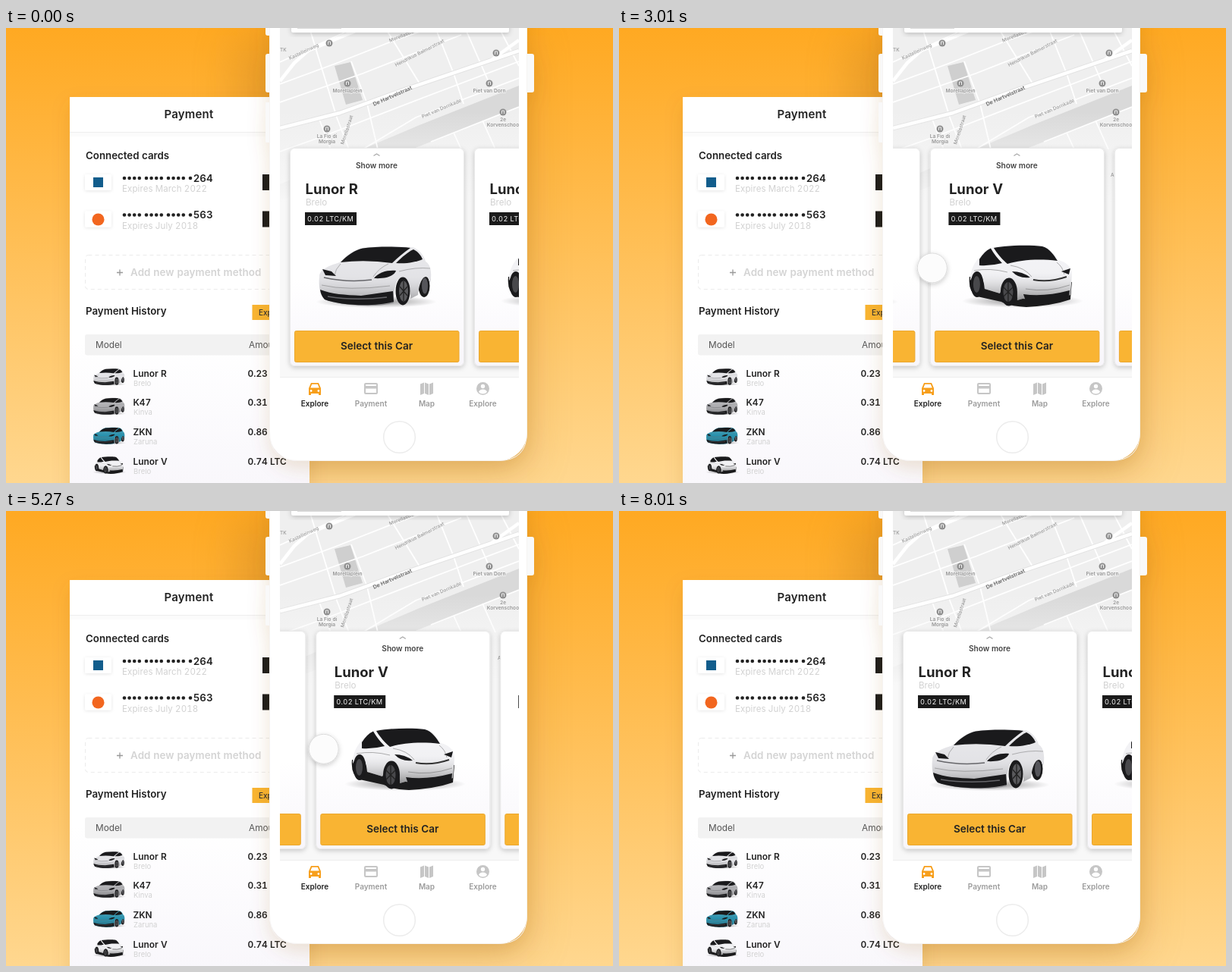
Write an HTML page that moves like this. It is 800 px wide and 600 px high and loops after 8.08 s.

```html
<!DOCTYPE html>
<html lang="en">
<head>
<meta charset="utf-8">
<title>Car sharing app</title>
<style>
  html, body { margin: 0; width: 100%; height: 100%; overflow: hidden; }
  svg { display: block; width: 800px; height: 600px; font-family: Inter, "Liberation Sans", sans-serif; font-feature-settings: "tnum"; }
  .b { font-weight: 600; fill: #222; }
  .mid { text-anchor: middle; }
  .pale { fill: #d2d2d2; }
  .road { fill: none; stroke: #fff; stroke-linejoin: round; }
  .place { font-size: 6.6px; font-weight: 600; fill: #969696; text-anchor: middle; stroke: #f3f3f3; stroke-width: 1.5px; paint-order: stroke; }
  .street { font-size: 6.4px; font-weight: 500; fill: #999; }
</style>
</head>
<body>
<svg viewBox="0 0 800 600">
  <defs>
    <linearGradient id="sky" x2="0" y2="1"><stop stop-color="#ffa922"/><stop offset="1" stop-color="#ffd78f"/></linearGradient>
    <linearGradient id="paper" x2="0" y2="1"><stop offset=".6" stop-color="#fff"/><stop offset="1" stop-color="#f8f6fb"/></linearGradient>
    <linearGradient id="fade" x2="0" y2="1"><stop stop-color="#f8f8f8" stop-opacity="0"/><stop offset="1" stop-color="#f8f8f8"/></linearGradient>
    <linearGradient id="shade" x2="0" y2="1"><stop stop-color="#fff" stop-opacity=".3"/><stop offset=".5" stop-color="#fff" stop-opacity=".1"/><stop offset="1" stop-color="#000" stop-opacity=".4"/></linearGradient>
    <radialGradient id="ground"><stop stop-opacity=".45"/><stop offset="1" stop-opacity="0"/></radialGradient>
    <clipPath id="screen"><path d="M361 0H676V503H361Z"/></clipPath>
    <filter id="soft" x="-20%" y="-20%" width="140%" height="140%"><feDropShadow dx="0" dy="2" stdDeviation="3" flood-opacity=".2"/></filter>
    <filter id="faint" x="-20%" y="-40%" width="140%" height="180%"><feDropShadow dx="0" dy="1" stdDeviation="2" flood-opacity=".1"/></filter>
    <filter id="deep" x="-30%" y="-20%" width="160%" height="150%"><feDropShadow dx="0" dy="10" stdDeviation="12" flood-color="#9a5a00" flood-opacity=".16"/></filter>
    <filter id="haze" x="-40%" y="-40%" width="180%" height="180%"><feGaussianBlur stdDeviation="30"/></filter>

    <path id="sedanHull" d="M413 328C413 319 424 314 440 309C450 299 460 292 470 290C490 287 520 287 537 289.500C546 293 551 301 553 308C558 311 561 318 560 330C560 336 559 338 558 334C555 322 545 328 543 352L533 357C534 336 526 327 519 330C513 333 511 348 511 363C485 369 440 366 420 358C413 351 412 338 413 328Z"/>
    <g id="sedan">
      <ellipse cx="488" cy="361" rx="80" ry="8" fill="url(#ground)"/>
      <ellipse cx="551" cy="340" rx="7.500" ry="15" fill="#1b1b1c"/>
      <use href="#sedanHull" fill="currentColor"/><use href="#sedanHull" fill="url(#shade)"/>
      <g fill="#1a1a1c">
        <path d="M441 309C450 299 460 293 470 290.500C490 288 515 288 533 290C524 296 516 303 509 310Q474 305 441 309Z"/>
        <path d="M514 310C522 302 530 295 537 292C543 295 547 300 549 305C540 309 527 311 514 310Z"/>
        <path d="M417 318L429 321L435 327L421 326Z"/>
        <path d="M485 330C491 322 503 319 514 320C512 327 500 331 485 330Z"/>
        <path d="M414 345C430 351 446 352 468 353L510 347L511 361C485 368 440 366 420 358Q415 353 414 345Z"/>
        <ellipse cx="523" cy="347" rx="9.500" ry="18.500"/>
      </g>
      <path d="M419 329Q450 336 482 332M424 354Q460 360 502 355" fill="none" stroke="#66666a" stroke-width="1.500"/>
      <path d="M441 311Q434 318 433 326M504 311Q491 317 484 328M518 321Q540 315 559 317M416 339Q450 347 506 340" fill="none" stroke="#555" stroke-opacity=".4"/>
      <ellipse cx="524" cy="347" rx="6" ry="13.500" fill="#5a5a5d"/>
      <path d="M524 334V360M519 341L529 353M519 353L529 341" stroke="#222" stroke-width="1.300"/>
      <ellipse cx="552" cy="340" rx="4" ry="10.500" fill="#55555a"/>
    </g>

    <path id="suvHull" d="M411 333C411 318 417 308 425 301C431 293 438 289 446 288C465 285 492 285 506 287C516 290 522 299 527 306C538 309 545 315 545 326L543 352Q520 360 480 357L473 359C474 337 464 328 455 340L450 350L430 344C429 326 420 318 411 333Z"/>
    <g id="suv" transform="translate(9)">
      <ellipse cx="480" cy="360" rx="80" ry="9" fill="url(#ground)"/>
      <path fill="#1b1b1c" d="M410 328H470L545 335L543 358Q520 366 485 368Q462 367 452 361L420 354Q408 348 410 328Z"/>
      <use href="#suvHull" fill="currentColor"/><use href="#suvHull" fill="url(#shade)"/>
      <g fill="#1a1a1c">
        <path d="M442 290C462 286 492 286 506 288C516 291 521 299 526 307C500 304 477 306 460 311C452 304 447 298 442 290Z"/>
        <path d="M423 305Q430 294 438 290.500Q444 301 453 310Q438 314 423 313Z"/>
        <path d="M466 321Q480 321 490 329Q475 331 466 321ZM531 321L543 317L541 325Z"/>
        <path d="M481 351Q508 355 542 346L541 357Q510 366 486 365Z"/>
        <ellipse cx="462" cy="348" rx="11" ry="18.500"/><ellipse cx="420" cy="338" rx="8.500" ry="17"/>
      </g>
      <path d="M494 332Q515 336 538 328" fill="none" stroke="#333" stroke-width="2"/>
      <path d="M464 313Q483 316 492 328M525 309Q533 315 535 325M416 320Q437 316 460 322M484 344Q513 349 542 339" fill="none" stroke="#555" stroke-opacity=".45"/>
      <ellipse cx="461" cy="348" rx="6.500" ry="13" fill="#48484b"/><ellipse cx="419.500" cy="338" rx="4.500" ry="11" fill="#48484b"/>
      <path d="M461 335V361M455 342L467 354M455 354L467 342" stroke="#222" stroke-width="1.300"/>
    </g>
  </defs>

  <rect width="800" height="600" fill="url(#sky)"/>
  <rect x="305" y="10" width="382" height="570" fill="#b0701c" opacity=".3" filter="url(#haze)"/>

  <!-- payment page -->
  <rect x="84" y="91" width="316" height="540" fill="url(#paper)" filter="url(#deep)"/>
  <rect x="84" y="138" width="316" height="5" fill="#fbfbfb"/>
  <path d="M84 137.500H400" stroke="#eee"/>
  <text class="b mid" x="241" y="119" font-size="15" letter-spacing=".2">Payment</text>
  <g class="b" font-size="13.300"><text x="105" y="173">Connected cards</text><text x="105" y="378">Payment History</text></g>
  <g id="cards"></g>
  <rect x="104.500" y="299.500" width="280" height="45" rx="4" fill="none" stroke="#ebebeb" stroke-dasharray="5 4"/>
  <path d="M146 322.500H154M150 318.500V326.500" stroke="#999" stroke-width="1.300"/>
  <text class="b" x="164" y="327" font-size="13.400" letter-spacing=".1" style="fill:#d4d4d4">Add new payment method</text>
  <rect x="324.500" y="365" width="60" height="20" fill="#f8b431"/>
  <text x="333" y="379" font-size="10" font-weight="500" fill="#333">Export</text>
  <rect x="104" y="404" width="280" height="27.500" rx="3" fill="#f2f2f2"/>
  <g font-size="11.800" fill="#555"><text x="118" y="422">Model</text><text x="320" y="422">Amount</text></g>
  <g id="history"></g>

  <!-- phone -->
  <g filter="url(#deep)">
    <path fill="#f9f9f9" d="M350 0V10H345Q342 10 342 7V0ZM350 34H345Q342 34 342 37V82Q342 85 345 85H350ZM350 98H345Q342 98 342 101V148Q342 151 345 151H350ZM684 34H693Q696 34 696 37V82Q696 85 693 85H684Z"/>
    <rect x="347" y="-60" width="340" height="631" rx="38" fill="#fff"/>
  </g>
  <path d="M347.500 0V533Q347.500 570.500 385 570.500H649Q686.500 570.500 686.500 533V0" fill="none" stroke="#f6f4f2"/>
  <circle cx="518.500" cy="539.500" r="20.800" fill="#fff" stroke="#ececec" stroke-width="1.500"/>

  <g clip-path="url(#screen)">
    <path fill="#efefef" d="M361 0H676V503H361Z"/>
    <path fill="#d9d9d9" d="M361 206L545 128L676 76V104L560 150L361 228Z"/>
    <path fill="#cfcfcf" d="M433 50L454 45L470 95L448 101Z"/>
    <g class="road">
      <path stroke-width="1.800" d="M361 45L446 6M361 74L434 47L510 17L560 0M400 0L436 118L452 160M361 98L470 60L600 9M455 44L476 100L490 160M500 0L545 73M566 0L590 60L603 100M361 163L420 142L560 88L676 44M470 160L540 118L676 66M605 0L640 80M650 0L676 50M412 118L428 160M560 150L676 104M590 138L600 160M628 122L645 160"/>
      <path stroke="#e2e2e2" stroke-width="6.500" d="M361 132L440 112L520 83L676 30"/>
      <path stroke-width="4.500" d="M361 132L440 112L520 83L676 30M361 70L380 46L398 30L470 0M640 42L676 16"/>
    </g>
    <path fill="url(#fade)" d="M361 110H676V230H361Z"/><path fill="#f8f8f8" d="M361 230H676V503H361Z"/>
    <g id="labels"></g>
    <rect x="376" y="-20" width="287" height="26" rx="3" fill="#fff" filter="url(#soft)"/>
    <path d="M384 0H442" stroke="#ccc" stroke-width="1.500"/>
    <g id="deck"></g>
    <rect x="361" y="460" width="315" height="43" fill="#fff"/>
    <path d="M361 460.500H676" stroke="#ededed"/>
    <path fill="#f79f1c" fill-rule="evenodd" d="M402 468H412L415 475V484H412V482H402V484H399V475ZM403.200 469.800L401.300 474.500H412.700L410.800 469.800ZM403.500 478.500A1.400 1.400 0 1 0 400.700 478.500A1.400 1.400 0 1 0 403.500 478.500ZM413.300 478.500A1.400 1.400 0 1 0 410.500 478.500A1.400 1.400 0 1 0 413.300 478.500Z"/>
    <g fill="#c6c6c6">
      <path fill-rule="evenodd" d="M474 468H488Q490 468 490 470V481Q490 483 488 483H474Q472 483 472 481V470Q472 468 474 468ZM474 470V472H488V470ZM474 475.500V481H488V475.500Z"/>
      <path d="M546 469.500L551 467.500V482L546 484ZM552 467.500L557 469.500V484L552 482ZM558 469.500L563 467.500V482L558 484Z"/>
      <circle cx="628.500" cy="475.500" r="8.500"/><circle cx="628.500" cy="472.500" r="2.700" fill="#fff"/>
      <path fill="#fff" d="M623 480Q624 476.500 628.500 476.500T634 480Q632 482.500 628.500 482.500T623 480Z"/>
    </g>
    <g id="tabs" class="mid" font-size="10" font-weight="600"></g>
    <g id="touch" filter="url(#soft)"><circle r="19.500" fill="#fcfcfc" stroke="#dadada"/></g>
  </g>
</svg>
<script>
const LOOP = 8080, PITCH = 243;
const $ = id => document.getElementById(id);
const fill = (id, items, draw) => { $(id).innerHTML = items.map(draw).join(''); };

const cars = { silver: ['sedan', '#e0e0e4'], white: ['suv', '#f0f0f3'], gray: ['sedan', '#a4a4a8'], teal: ['sedan', '#0f84a3'] };
const drawCar = (kind, extra = '') => `<use href="#${cars[kind][0]}" style="color:${cars[kind][1]}" ${extra}/>`;

fill('cards', [['264', 'Expires March 2022'], ['563', 'Expires July 2018']], ([digits, expiry], i) => {
  let dots = '';
  for (let k = 0; k < 13; k++)
    dots += `<circle cx="${156 + k % 4 * 6.6 + Math.floor(k / 4) * 29}" cy="198" r="2.3"/>`;
  const mark = i ? '<circle cx="121.500" cy="204" r="8" fill="#f2661f"/>'
                 : '<rect x="115" y="197" width="13" height="13" fill="#125d8c"/>';
  return `<g transform="translate(0 ${i * 48.5})">
    <rect x="104" y="193" width="35" height="21" rx="2" fill="#fff" filter="url(#faint)"/>${mark}
    <g class="b">${dots}<text x="272.500" y="202.500" font-size="13.300" text-anchor="end">${digits}</text></g>
    <text class="pale" x="153" y="216" font-size="11.500" letter-spacing=".1">${expiry}</text>
    <rect x="338" y="193" width="30" height="21" fill="#1b1b1b"/></g>`;
});

fill('history', [['Lunor R', 'Brelo', '0.23', 'silver'], ['K47', 'Kinva', '0.31', 'gray'],
  ['ZKN', 'Zaruna', '0.86', 'teal'], ['Lunor V', 'Brelo', '0.74', 'white']], ([name, maker, price, kind], i) =>
  `<g transform="translate(0 ${i * 38.8})">
    ${drawCar(kind, 'transform="translate(-.5 368.500) scale(.28)"')}
    <g class="b" font-size="11.900"><text x="167.500" y="459.500">${name}</text><text x="318.500" y="459.500">${price} LTC</text></g>
    <text class="pale" x="168" y="471.500" font-size="9.500">${maker}</text></g>`);

const pins = [[426, 20], [646, 33], [450, 73, 'Morellaplein'], [637, 73, 'Piet van Dorn'],
  [655, 111, '2e', 'Korvenschoo'], [423, 133, 'La Fio di', 'Morgia']];
const streets = [[374, 42, -25, 'Kastelleinweg'], [514, 51, -27, 'Hendrikus Balmerstraat'], [506, 19, -22, 'Morellastraat'],
  [549, 119, -23, 'Piet van Dornkade'], [445, 154, -72, 'Morellastraat'], [361, 31, 0, 'TK'], [648, 196, 0, 'A'],
  [485, 103, -24, 'De Hartvelstraat', 'font-size:7px;font-weight:600;fill:#666']];
fill('labels', streets, ([x, y, turn, name, style = '']) =>
  `<text class="street" style="${style}" transform="translate(${x} ${y}) rotate(${turn})">${name}</text>`);
$('labels').innerHTML += pins.map(([x, y, ...lines]) =>
  `<circle cx="${x}" cy="${y}" r="4.5" fill="#8f8f8f"/><path d="M${x - 1.5} ${y + 2}V${y - 2}H${x + 1.5}V${y + 2}" fill="none" stroke="#eee"/>` +
  lines.map((line, i) => `<text class="place" x="${x}" y="${y + 12 + i * 6.5}">${line}</text>`).join('')).join('');

fill('deck', [['Lunor R', 'Brelo', 'silver'], ['Lunor V', 'Brelo', 'white'], ['ZKN', 'Zaruna', 'teal']], ([name, maker, kind], i) =>
  `<g transform="translate(${i * PITCH})">
    <rect x="374.500" y="158.500" width="229" height="287" rx="6" fill="url(#paper)" stroke="#e9e9e9" filter="url(#soft)"/>
    <path d="M484.500 168.500L488.500 166L492.500 168.500" fill="none" stroke="#aaa" stroke-width="1.300"/>
    <text class="b mid" x="488.500" y="185" font-size="10.100" style="fill:#444">Show more</text>
    <g class="info">
      <text class="b" x="394.500" y="218.500" font-size="18.500" style="font-weight:700">${name}</text>
      <text class="pale" x="395" y="234" font-size="11.600">${maker}</text>
      <rect x="394" y="243" width="68" height="17" fill="#1a1a1a"/>
      <text x="397" y="254.800" font-size="9.200" letter-spacing=".35" fill="#f2f2f2">0.02 LTC/KM</text>
    </g>
    <g class="car">${drawCar(kind, kind === 'teal' ? 'x="-7"' : '')}</g>
    <rect x="380.500" y="399.500" width="216.500" height="41" rx="2" fill="#f9b433" stroke="#eaa72e"/>
    <text class="b mid" x="488.500" y="424" font-size="13.500">Select this Car</text></g>`);

fill('tabs', [['Explore', 407, '#222'], ['Payment', 481, '#9b9b9b'], ['Map', 554.5, '#9b9b9b'], ['Explore', 628.5, '#9b9b9b']],
  ([name, x, color]) => `<text x="${x}" y="499" fill="${color}">${name}</text>`);

// Keys are [time, value]; each stretch eases in and out.
const ease = p => p < .5 ? 4 * p ** 3 : 1 - 4 * (1 - p) ** 3;
function track(t, keys) {
  const next = keys.findIndex(k => k[0] > t);
  if (next < 0) return keys[keys.length - 1][1];
  if (!next) return keys[0][1];
  const [t0, a] = keys[next - 1], [t1, b] = keys[next];
  return a + (b - a) * ease((t - t0) / (t1 - t0));
}

const slide = [[1800, 0], [3676, -252], [4600, -252], [6525, 3.5], [7000, 3.5], [7850, 0]];
const infoLag = [[1800, 0], [2700, 4.5], [3100, 4.5], [3900, .5], [4600, .5], [5700, 5], [6600, 5.7], [7000, 5.7], [7900, 0]];
const carLag = [[1800, 0], [2700, 7], [3100, 7], [4000, 0], [4600, 0], [5900, 5], [6600, 7.5], [7000, 7.5], [8010, 0]];
const touchX = [[1800, 618], [3610, 378], [4600, 378], [6609, 651]];
const touchY = [[1800, 319], [3610, 316], [4600, 316], [5900, 312]];
const touchAlpha = [[900, 0], [1200, 1], [6950, 1], [7300, 0]];

const infos = document.querySelectorAll('.info'), bodies = document.querySelectorAll('.car');
const move = (el, x, y = 0) => el.setAttribute('transform', `translate(${x} ${y})`);
const start = performance.now();

function frame() {
  const t = (performance.now() - start) % LOOP;
  move($('deck'), track(t, slide));
  infos.forEach(el => move(el, track(t, infoLag)));
  bodies.forEach(el => move(el, track(t, carLag)));
  move($('touch'), track(t, touchX), track(t, touchY));
  $('touch').setAttribute('opacity', track(t, touchAlpha));
  requestAnimationFrame(frame);
}
frame();
</script>
</body>
</html>
```
